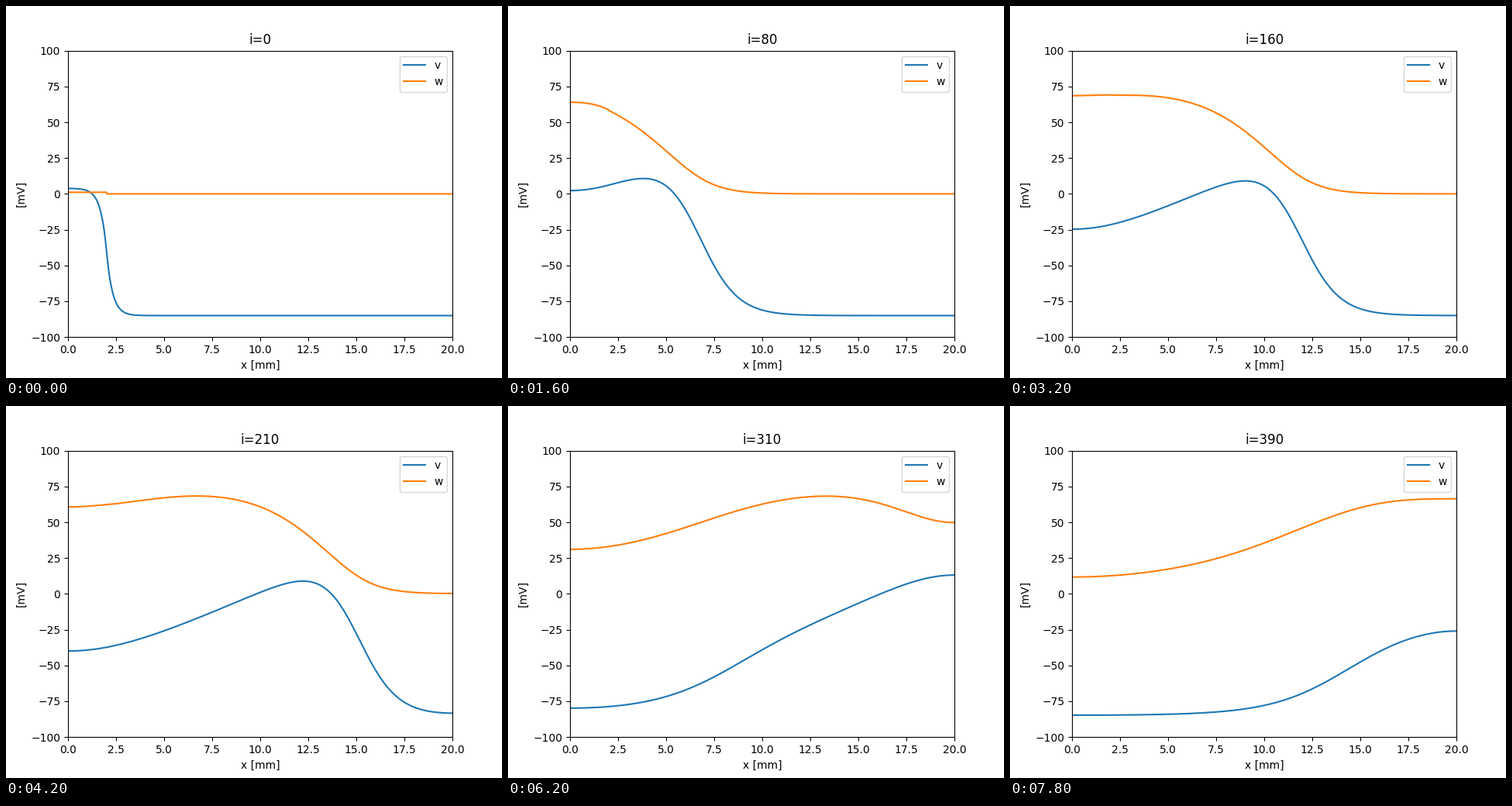
Recreate the animation shown at these times as a matplotlib script. Size 640 px wide and 480 px high, loop 8000 ms.

```python
import numpy as np
import matplotlib.pyplot as plt
from matplotlib.animation import FuncAnimation

# FitzHugh-Nagumo membrane model (mV, ms)
A, B, C1, C2, C3 = 0.13, 0.013, 0.26, 0.1, 1.0
V_REST, V_PEAK = -85.0, 40.0
V_AMP = V_PEAK - V_REST
V_TH = V_REST + A * V_AMP

# Monodomain cable: harmonic mean conductivity / (chi * Cm), in mm^2/ms
DIFF = 0.17 * 0.62 / (0.17 + 0.62) / (140 * 0.01)
LENGTH, CELLS, DT = 20.0, 1000, 1.0
STRIDE, FRAMES = 10, 40


def diffusion_operator(n, dx):
    """Inverse of the implicit Euler matrix with no-flux ends."""
    r = DIFF * DT / dx**2
    m = np.diag(np.full(n, 1 + 2 * r))
    m -= r * (np.eye(n, k=1) + np.eye(n, k=-1))
    m[0, 1] = m[-1, -2] = -2 * r
    return np.linalg.inv(m)


def reaction(v, w):
    u = v - V_REST
    dv = C1 / V_AMP**2 * u * (v - V_TH) * (V_PEAK - v) - C2 / V_AMP * u * w
    dw = B * (u - C3 * w)
    return dv, dw


def simulate(x):
    v = np.where(x < 2.0 + 1e-9, 0.0, V_REST)
    w = np.zeros_like(x)
    spread = diffusion_operator(x.size, x[1] - x[0])
    saved = []
    for i in range((FRAMES - 1) * STRIDE + 1):
        dv, dw = reaction(v, w)
        v = V_REST + spread @ (v + DT * dv - V_REST)
        w = w + DT * dw
        if i % STRIDE == 0:
            saved.append((v, w))
    return saved


x = np.linspace(0, LENGTH, CELLS + 1)
states = simulate(x)

fig, ax = plt.subplots(figsize=(6.4, 4.8), dpi=100)
line_v, = ax.plot(x, states[0][0], label="v")
line_w, = ax.plot(x, states[0][1], label="w")
ax.set_xlim(0, LENGTH)
ax.set_ylim(-100, 100)
ax.set_xlabel("x [mm]")
ax.set_ylabel("[mV]")
ax.legend(loc="upper right")
title = ax.set_title("i=0")


def update(k):
    v, w = states[k]
    line_v.set_ydata(v)
    line_w.set_ydata(w)
    title.set_text(f"i={k * STRIDE}")
    return line_v, line_w, title


anim = FuncAnimation(fig, update, frames=FRAMES, interval=200,
                     repeat=True, repeat_delay=0)
plt.show()
```
